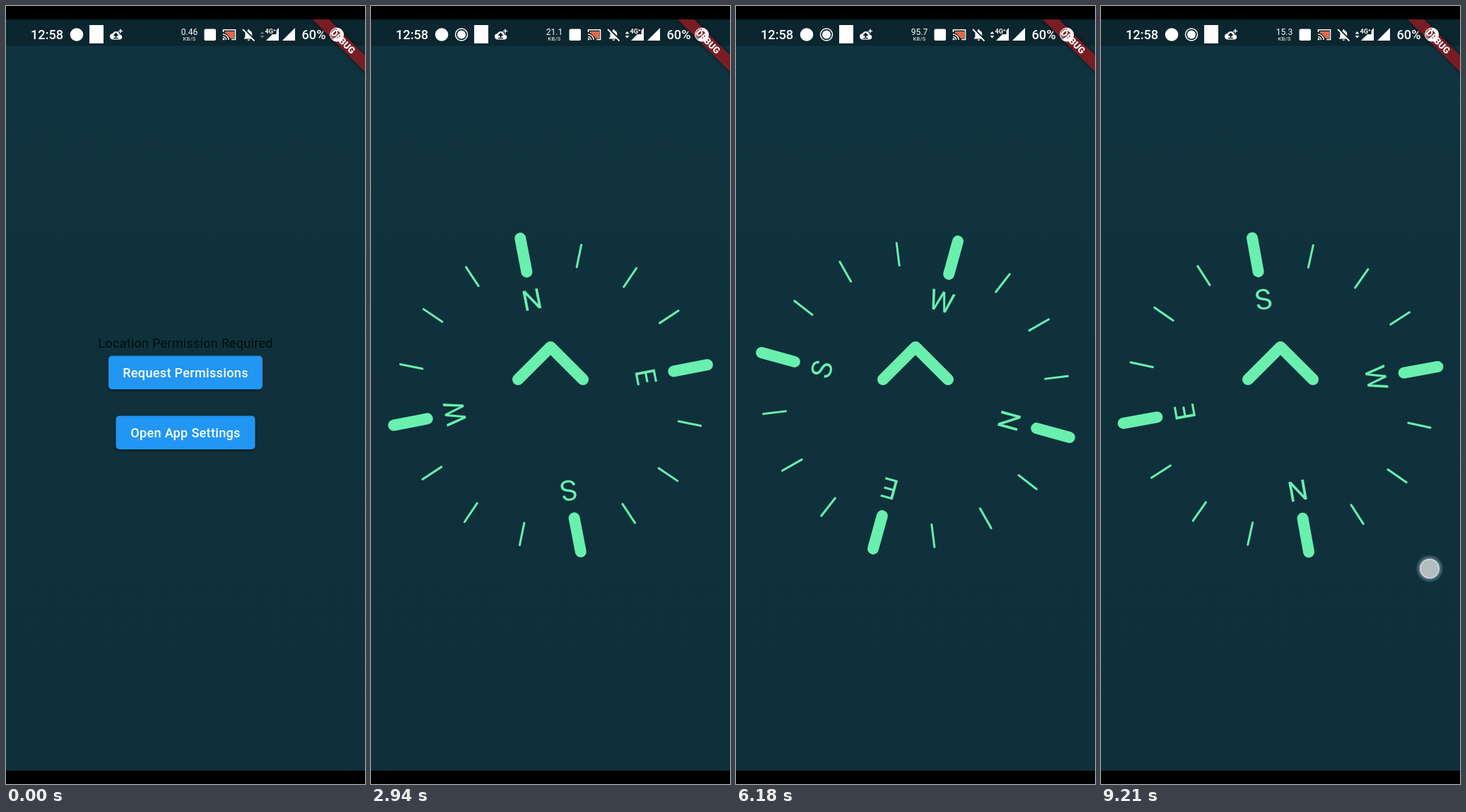
Write an HTML page with a canvas that moves like this. It is 508x1102 px and loops after 9270 ms.

```html
<!DOCTYPE html>
<html lang="en">
<head>
<meta charset="utf-8">
<title>Compass</title>
<style>
  html, body { margin: 0; width: 100%; height: 100%; overflow: hidden; background: #000; }
  canvas { display: block; }
</style>
</head>
<body>
<canvas id="stage" width="508" height="1102"></canvas>
<script>
const ctx = document.getElementById('stage').getContext('2d');
const LOOP = 9270, TAU = Math.PI * 2;
const MINT = '#69f0ae', TEAL = '#80cbc4', BAR = '#0b262f';
const CENTER = { x: 254, y: 551 };

// Direction of north in degrees clockwise from up: [time, angle]
const HEADING = [
  [2850, -11], [3350, -10], [3950, 38], [4450, 11], [4640, 15.4], [5700, 155],
  [6180, 105.4], [6400, 99], [7250, 170.5], [7450, 169.4], [9210, 169.8]
];
// Touches: [from, to, x, y]
const TOUCHES = [[640, 960, 262, 524], [2220, 2480, 262, 584], [8400, LOOP, 465, 797]];

const ICONS = {
  cloud: new Path2D('M19.35 10.04A7.49 7.49 0 0 0 12 4C9.11 4 6.6 5.64 5.35 8.04A6 6 0 0 0 0 14c0 3.31 2.69 6 6 6h13c2.76 0 5-2.24 5-5 0-2.64-2.05-4.78-4.65-4.96z'),
  bell: new Path2D('M12 22c1.1 0 2-.9 2-2h-4c0 1.1.9 2 2 2zm6-6v-5c0-3.07-1.63-5.64-4.5-6.32V4c0-.83-.67-1.5-1.5-1.5s-1.5.67-1.5 1.5v.68C7.64 5.36 6 7.92 6 11v5l-2 2v1h16v-1l-2-2z'),
  pin: new Path2D('M12 2C8.13 2 5 5.13 5 9c0 5.25 7 13 7 13s7-7.75 7-13c0-3.87-3.13-7-7-7zM7 9c0-2.76 2.24-5 5-5s5 2.24 5 5c0 2.88-2.88 7.19-5 9.88C9.92 16.21 7 11.85 7 9z')
};

const clamp = v => Math.max(0, Math.min(1, v));
const smooth = v => { v = clamp(v); return v * v * (3 - 2 * v); };
const ramp = (t, from, to) => smooth((t - from) / (to - from));

function headingAt(t) {
  for (let i = 1; i < HEADING.length; i++) {
    const [t0, a0] = HEADING[i - 1], [t1, a1] = HEADING[i];
    if (t <= t1) return a0 + (a1 - a0) * ramp(t, t0, t1);
  }
  return HEADING[HEADING.length - 1][1];
}

function text(str, x, y, size, color, { weight = 400, align = 'center', spacing = 0 } = {}) {
  ctx.font = `${weight} ${size}px Roboto, sans-serif`;
  ctx.letterSpacing = spacing + 'px';
  ctx.textAlign = align;
  ctx.fillStyle = color;
  ctx.fillText(str, x, y);
  const width = ctx.measureText(str).width;
  ctx.letterSpacing = '0px';
  return width;
}

function rect(x, y, w, h, color, radius = 0) {
  ctx.fillStyle = color;
  ctx.beginPath();
  ctx.roundRect(x, y, w, h, radius);
  ctx.fill();
}

function circle(x, y, r, color) {
  ctx.fillStyle = color;
  ctx.beginPath();
  ctx.arc(x, y, r, 0, TAU);
  ctx.fill();
}

function arc(x, y, r, from, to, color, width) {
  ctx.strokeStyle = color;
  ctx.lineWidth = width;
  ctx.beginPath();
  ctx.arc(x, y, r, from, to);
  ctx.stroke();
}

function polygon(points, color) {
  ctx.fillStyle = color;
  ctx.beginPath();
  points.forEach(p => ctx.lineTo(...p));
  ctx.fill();
}

function line(points, color, width) {
  ctx.strokeStyle = color;
  ctx.lineWidth = width;
  ctx.beginPath();
  points.forEach(p => ctx.lineTo(...p));
  ctx.stroke();
}

function icon(path, x, y, scale, color) {
  ctx.save();
  ctx.translate(x, y);
  ctx.scale(scale, scale);
  ctx.fillStyle = color;
  ctx.fill(path, 'evenodd');
  ctx.restore();
}

function drawBackground() {
  const sky = ctx.createLinearGradient(0, 57, 0, 1083);
  sky.addColorStop(0, '#10343f');
  sky.addColorStop(.4, '#0f313c');
  sky.addColorStop(1, '#0f303b');
  rect(0, 0, 508, 1102, '#000');
  rect(0, 19, 508, 1064, sky);
  rect(0, 19, 508, 37.5, BAR);
}

function button(label, x, y, w) {
  ctx.save();
  ctx.shadowColor = 'rgba(0,0,0,.45)';
  ctx.shadowBlur = 4;
  ctx.shadowOffsetY = 2;
  rect(x, y, w, 47.5, '#2196f3', 5);
  ctx.restore();
  text(label, 254, y + 30.5, 18.1, '#fff', { weight: 500, spacing: .3 });
}

function drawRequestPage() {
  text('Location Permission Required', 254, 484, 18.1, '#050d10', { spacing: .23 });
  button('Request Permissions', 145, 495.5, 218);
  button('Open App Settings', 155.5, 580.5, 197);
}

function drawCompass(t) {
  ctx.save();
  ctx.lineCap = 'round';
  ctx.lineJoin = 'round';
  ctx.translate(CENTER.x, CENTER.y);
  line([[-46, -22], [0, -68], [46, -22]], MINT, 16);
  ctx.rotate(headingAt(t) * TAU / 360);
  for (let i = 0; i < 16; i++) {
    if (i % 4) {
      line([[0, -185], [0, -217]], MINT, 3);
    } else {
      line([[0, -177.5], [0, -226]], MINT, 16);
      text('NESW'[i / 4], 0, -123.5, 40, MINT);
    }
    ctx.rotate(TAU / 16);
  }
  ctx.restore();
}

function drawBanner() {
  ctx.save();
  ctx.beginPath();
  ctx.rect(0, 19, 508, 1064);
  ctx.clip();
  ctx.translate(477, 50.5);
  ctx.rotate(TAU / 8);
  ctx.shadowColor = 'rgba(0,0,0,.5)';
  ctx.shadowBlur = 7;
  rect(-80, -8.2, 160, 16.4, '#7a1c23');
  ctx.shadowBlur = 0;
  text('DEBUG', 0, 4.6, 13.2, '#fff', { weight: 900 });
  ctx.restore();
}

function drawDialog(alpha) {
  ctx.save();
  ctx.globalAlpha = alpha;
  const scale = .94 + .06 * alpha;
  ctx.translate(254, 570);
  ctx.scale(scale, scale);
  ctx.translate(-254, -570);
  rect(34, 371, 440, 398, '#3c3e42', 11);
  icon(ICONS.pin, 238, 394.4, 1.34, TEAL);
  circle(254, 406.5, 3.4, TEAL);

  let x = 82;
  for (const [part, weight] of [['Allow ', 500], ['example', 700], [' to access this', 500]])
    x += text(part, x, 471, 26.3, '#fff', { weight, align: 'left' });
  text('device’s location?', 254, 502, 26.3, '#fff', { weight: 500 });

  ['WHILE USING THE APP', 'ONLY THIS TIME', 'DENY'].forEach((label, i) => {
    rect(34, 542 + i * 76, 440, 1.2, '#55575b');
    text(label, 254, 587 + i * 76, 18.2, TEAL, { weight: 500, spacing: .1 });
  });
  ctx.restore();
}

function drawStatus(t) {
  const white = '#fff', dark = '#0a1d24';
  const recording = t >= 600;
  const shift = recording ? 28 : 0;
  text('12:58', 35, 47, 18.2, white, { weight: 500, align: 'left' });
  circle(100, 40.5, 9.3, white);
  if (recording) {
    arc(128, 40.5, 8.5, 0, TAU, white, 1.5);
    circle(128, 40.5, 6, white);
  }
  rect(118 + shift, 27, 20, 26, white);
  icon(ICONS.cloud, 147 + shift, 33.2, .72, white);
  polygon([[151.5 + shift, 42], [155.5 + shift, 37.5], [159.5 + shift, 42]], dark);
  rect(154.3 + shift, 41, 2.4, 3.5, dark);
  rect(152 + shift, 45, 7, 1.2, dark);
  line([[159 + shift, 35.5], [165 + shift, 35.5]], white, 1.4);
  line([[162 + shift, 32.5], [162 + shift, 38.5]], white, 1.4);

  const speed = t < 1900 ? '0.46' : t < 4900 ? '21.1' : t < 7900 ? '95.7' : '15.3';
  text(speed, 259.5, 41, 12, white);
  text('KB/S', 259.5, 49, 7.6, white, { spacing: .2 });
  rect(280.5, 32.5, 16.5, 16.5, white, 2);

  rect(310, 36, 13, 10, '#e2694a');
  line([[307.5, 37], [307.5, 33.8], [324.5, 33.8], [324.5, 47.5], [319, 47.5]], white, 1.6);
  polygon([[307, 39], [312, 39], [318, 46], [317, 48], [307, 48]], dark);
  for (const r of [4.5, 8]) arc(307, 48, r, -TAU / 4, 0, white, 1.5);
  circle(308, 47, 1.4, white);

  icon(ICONS.bell, 333.5, 31, .82, white);
  line([[336, 31.5], [353, 48.5]], dark, 2);
  line([[335, 33], [351.5, 49.5]], white, 1.8);

  const arrows = t < 2500 ? '#6a7579' : white;
  polygon([[359.5, 39.5], [362.5, 36], [365.5, 39.5]], arrows);
  polygon([[359.5, 42], [362.5, 45.5], [365.5, 42]], arrows);
  polygon([[368, 49], [386, 49], [386, 31]], white);
  rect(366, 30.5, 16.5, 9.5, dark);
  text('4G⁺', 366.5, 38.5, 9.2, white, { weight: 700, align: 'left' });
  polygon([[391, 49], [409, 49], [409, 31]], white);

  text('60%', 418.5, 47, 18.2, white, { weight: 500, align: 'left' });
  arc(468, 40.5, 7.6, 0, TAU, 'rgba(255,255,255,.35)', 4);
  arc(468, 40.5, 7.6, -TAU / 4, TAU * .35, white, 4.4);
  arc(468, 40.5, 9.4, 0, TAU, white, 1);
}

function drawTouch(x, y, alpha) {
  ctx.save();
  ctx.globalAlpha = alpha;
  const glow = ctx.createRadialGradient(x, y, 13, x, y, 20);
  glow.addColorStop(0, 'rgba(150,180,195,.65)');
  glow.addColorStop(1, 'rgba(150,180,195,0)');
  circle(x, y, 20, glow);
  circle(x, y, 14, '#d5dadc');
  circle(x, y, 12.5, '#b3bcbf');
  ctx.restore();
}

function draw(t) {
  drawBackground();
  if (t < 2850) drawRequestPage();
  else drawCompass(t);
  drawBanner();

  const dialog = ramp(t, 1080, 1290) * (1 - ramp(t, 2480, 2640));
  if (dialog > 0) {
    rect(0, 19, 508, 1064, `rgba(0,0,0,${.62 * dialog})`);
    drawDialog(dialog);
  }
  drawStatus(t);
  for (const [from, to, x, y] of TOUCHES) {
    const fadeOut = to === LOOP ? 1 : 1 - ramp(t, to - 60, to);
    const alpha = ramp(t, from, from + 60) * fadeOut;
    if (alpha > 0) drawTouch(x, y, alpha);
  }
}

function tick() {
  draw(performance.now() % LOOP);
  requestAnimationFrame(tick);
}
tick();
</script>
</body>
</html>
```
